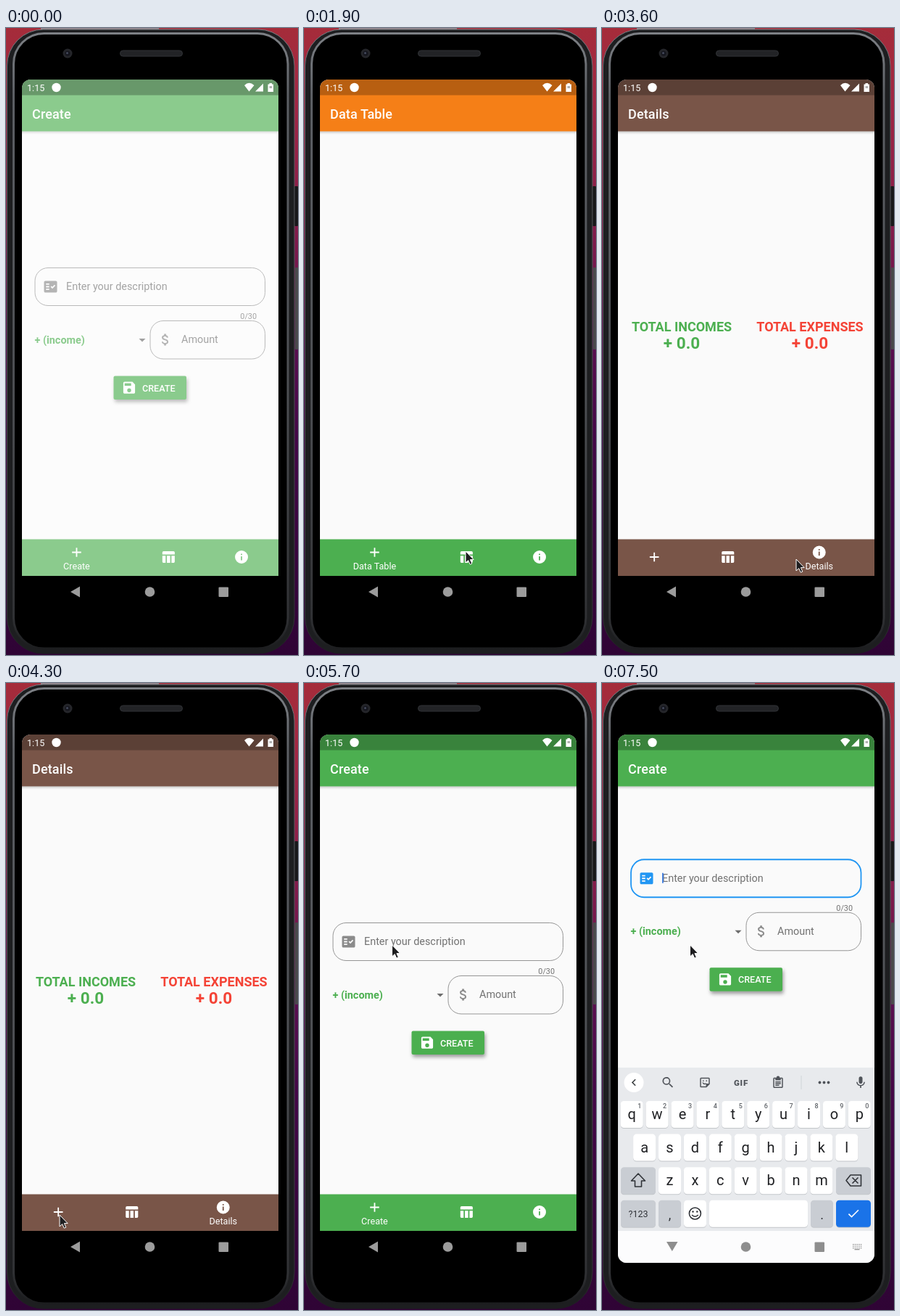
An HTML page that plays this animation: 403 px wide and 864 px high, repeating every 8 s.

```html
<!DOCTYPE html>
<html lang="en">
<head>
<meta charset="utf-8">
<title>Budget app demo</title>
<style>
html, body { margin: 0; width: 100%; height: 100%; overflow: hidden; background: #000; }
svg { display: block; width: 403px; height: 864px; font-family: Roboto, sans-serif; }
.mid { text-anchor: middle; }
.med { font-weight: 500; }
.bold { font-weight: 700; }
</style>
</head>
<body>
<svg id="stage" viewBox="0 0 403 864" xmlns="http://www.w3.org/2000/svg"></svg>
<script>
const LOOP = 8000, STEP = 100;
const GREEN = '#4caf50', GREY = '#8b8b8b', INK = '#50545a';
const PAGES = [
  { title: 'Create', color: GREEN },
  { title: 'Data Table', color: '#f57f17' },
  { title: 'Details', color: '#795548' }
];

const P = {
  add: 'M19 13h-6v6h-2v-6H5v-2h6V5h2v6h6z',
  table: 'M10 10h5v11h-5zM17 21h3c1.1 0 2-.9 2-2v-9h-5zM20 3H5c-1.1 0-2 .9-2 2v3h19V5c0-1.1-.9-2-2-2zM3 19c0 1.1.9 2 2 2h3V10H3z',
  info: 'M12 2a10 10 0 1 0 0 20a10 10 0 1 0 0-20zm1 15h-2v-6h2zm0-8h-2V7h2z',
  save: 'M17 3H5c-1.1 0-2 .9-2 2v14c0 1.1.9 2 2 2h14c1.1 0 2-.9 2-2V7zM12 19a3 3 0 1 1 0-6a3 3 0 1 1 0 6zM15 9H5V5h10z',
  list: 'M20 3H4c-1.1 0-2 .9-2 2v14c0 1.1.9 2 2 2h16c1.1 0 2-.9 2-2V5c0-1.1-.9-2-2-2zM10 17H5v-2h5zM10 13H5v-2h5zM10 9H5V7h5zM14.8 15L12 12.2l1.4-1.4 1.4 1.4L18 9l1.4 1.4z',
  money: 'M11.8 10.9c-2.27-.59-3-1.2-3-2.15 0-1.09 1.01-1.85 2.7-1.85 1.78 0 2.44.85 2.5 2.1h2.21c-.07-1.72-1.12-3.3-3.21-3.81V3h-3v2.16c-1.94.42-3.5 1.68-3.5 3.61 0 2.31 1.91 3.46 4.7 4.13 2.5.6 3 1.48 3 2.41 0 .69-.49 1.79-2.7 1.79-2.06 0-2.87-.92-2.98-2.1h-2.2c.12 2.19 1.76 3.42 3.68 3.83V21h3v-2.15c1.95-.37 3.5-1.5 3.5-3.55 0-2.84-2.43-3.81-4.7-4.4z',
  search: 'M15.5 14h-.8l-.3-.3A6.5 6.5 0 1 0 13.7 14.4l.3.3v.8l5 5 1.5-1.5zM9.5 14a4.5 4.5 0 1 1 0-9a4.5 4.5 0 1 1 0 9z',
  mic: 'M12 14c1.7 0 3-1.3 3-3V5a3 3 0 0 0-6 0v6c0 1.7 1.3 3 3 3zm5.3-3c0 3-2.5 5.1-5.3 5.1S6.7 14 6.7 11H5c0 3.4 2.7 6.2 6 6.7V21h2v-3.3c3.3-.5 6-3.3 6-6.7z',
  palette: 'M12 3a9 9 0 0 0 0 18c.8 0 1.5-.7 1.5-1.5 0-.4-.2-.7-.4-1-.2-.3-.4-.6-.4-1 0-.8.7-1.5 1.5-1.5H16c2.8 0 5-2.2 5-5 0-4.4-4-8-9-8zM5 10.5h3v2h-3zM8 6.5h3v2h-3zM13 6.5h3v2h-3zM16 10.5h3v2h-3z',
  chevron: 'M15.4 7.4L14 6l-6 6 6 6 1.4-1.4L10.8 12z',
  check: 'M9 16.2L4.8 12l-1.4 1.4L9 19 21 7l-1.4-1.4z',
  clip: 'M19 3h-4a3 3 0 0 0-6 0H5c-1.1 0-2 .9-2 2v15c0 1.1.9 2 2 2h14c1.1 0 2-.9 2-2V5c0-1.1-.9-2-2-2zM5 5h2v3h10V5h2v15H5zM7 10h10v2H7zM7 13h10v2H7zM7 16h7v2H7z',
  note: 'M3 3h18v9h-2V5H5v14h6v2H3zM10 9l9 5-3 1 4 4-2 2-4-4-1 3z',
  sticker: 'M3 5q0-2 2-2h14q2 0 2 2v10l-6 6H5q-2 0-2-2zM5 5v14h9v-5h5V5zM8 8h2v2H8zM14 8h2v2h-2zM7 12h2q2 3 5 1l1 1q-5 4-8-2z'
};

const icon = (name, cx, cy, fill, size = 21.6, id = '') =>
  `<path ${id && `id="${id}"`} d="${P[name]}" fill="${fill}" fill-rule="evenodd" transform="translate(${cx - size / 2} ${cy - size / 2}) scale(${size / 24})"/>`;
const rect = (x, y, w, h, fill, r = 0, more = '') =>
  `<rect x="${x}" y="${y}" width="${w}" height="${h}" rx="${r}" fill="${fill}" ${more}/>`;
const text = (s, x, y, size, fill, more = '') =>
  `<text x="${x}" y="${y}" font-size="${size}" fill="${fill}" ${more}>${s}</text>`;
const circle = (x, y, r, fill, more = '') =>
  `<circle cx="${x}" cy="${y}" r="${r}" fill="${fill}" ${more}/>`;
const line = (d, color, w = 1.6) =>
  `<path d="${d}" fill="none" stroke="${color}" stroke-width="${w}" stroke-linejoin="round"/>`;
const gradient = (id, stops) =>
  `<linearGradient id="${id}" x2="0" y2="1">${stops.map(([o, c, a = 1]) =>
    `<stop offset="${o}" stop-color="${c}" stop-opacity="${a}"/>`).join('')}</linearGradient>`;

function phone() {
  return rect(0, 0, 403, 864, 'url(#wall)') +
    rect(48, 0, 163, 2, '#94868d') +
    rect(398, 218, 5, 55, '#18181a', 1) + rect(399, 330, 4, 113, '#4a494c', 1) +
    rect(1.5, 2, 396.5, 860, '#1d1e20', 50, 'stroke="url(#rim)"') +
    rect(10.5, 7.5, 378.5, 847.5, '#000', 42, 'stroke="url(#rim)" stroke-width="3"') +
    circle(85, 35, 6.5, '#25262a') + circle(85, 35, 3.5, '#15161e') + circle(84.5, 34.5, 1.5, '#454a5c') +
    rect(157.5, 31, 86, 8, '#222326', 4, 'stroke="#303236"');
}

function statusBar() {
  return rect(22, 71, 354, 21.6, '#000', 0, 'opacity=".25"') +
    text('1:15', 29, 86.5, 12.6, '#fff') + circle(69.5, 82, 6.2, '#fff') +
    '<path d="M335.5 87.5L329 79Q335.5 72.5 342.5 79ZM344 87.500H355V76.500Z" fill="#fff"/>' +
    '<path d="M361.5 77.5h2v-1.5h3.5v1.5h2V88h-7.5Z" fill="#fff"/>' +
    rect(363.5, 80, 3.5, 3, '#000', 0, 'opacity=".3"');
}

function form() {
  const hint = '#727272';
  return `<g id="form">
    ${rect(40, 330.5, 317.5, 52, 'none', 18, 'id="field"')}
    ${icon('list', 61.5, 356.5, GREY, 21.6, 'fieldIcon')}
    ${text('Enter your description', 83, 361, 14.4, hint)}
    ${rect(83, 349, 1.8, 14, '#3f7de0', 0, 'id="caret"')}
    ${text('0/30', 346, 401, 10.8, hint, 'text-anchor="end"')}
    ${text('+ (income)', 39.5, 434.7, 14.4, GREEN, 'class="bold"')}
    <path d="M183.5 428h9l-4.5 4.5Z" fill="#6d6d6d"/>
    ${rect(199, 403.5, 158.5, 52.5, 'none', 18, `stroke="${GREY}" stroke-width=".9"`)}
    ${icon('money', 220, 429.5, GREY)}
    ${text('Amount', 242, 434, 14.4, hint)}
    ${rect(148.5, 479.5, 100.5, 32.5, GREEN, 2, 'filter="url(#lift)"')}
    ${icon('save', 170, 495.7, '#fff')}
    ${text('CREATE', 188, 500.5, 12.6, '#fff', 'class="med"')}
  </g>`;
}

function details() {
  const total = (label, x, color) =>
    text(label, x, 417.5, 18, color, 'class="mid bold"') +
    text('+ 0.0', x, 442, 22.5, color, 'class="mid bold"');
  return `<g id="details">${total('TOTAL INCOMES', 110, GREEN)}${total('TOTAL EXPENSES', 287, '#f44336')}</g>`;
}

// Drawn with its top at y = 0.
function keyboard() {
  const pitch = 34.9, keyH = 37, rows = ['qwertyuiop', 'asdfghjkl', 'zxcvbnm'];
  const starts = [41.2, 58.6, 93.5], dark = '#c9cdd3';
  const key = (x, y, w, fill) => rect(x, y + 1, w, keyH, '#c3c6ca', 4.5) + rect(x, y, w, keyH, fill, 4.5);
  let out = rect(22, 0, 354, 270, '#e8eaed') + rect(22, 225, 354, 60, '#fcfcfd') +
    circle(44, 20.5, 13.5, '#fff') + icon('chevron', 44, 20.5, '#3c4043', 19);

  const early = icon('clip', 91, 20.5, INK, 18) +
    circle(142, 20.5, 4.5, 'none', `stroke="${INK}" stroke-width="3.6"`) +
    circle(142, 20.5, 7, 'none', `stroke="${INK}" stroke-width="2.4" stroke-dasharray="3.665"`) +
    icon('palette', 193, 20.5, INK, 20) + icon('note', 243, 20.5, INK, 18);
  const late = icon('search', 91, 20.5, INK, 20) + icon('sticker', 142, 20.5, INK, 18) +
    text('GIF', 192, 24.5, 11.5, INK, 'class="mid" font-weight="900" letter-spacing=".8"') +
    icon('clip', 243, 20.5, INK, 18);
  out += `<g id="early">${early}</g><g id="late">${late}</g>` + rect(274.5, 11, 1, 19, '#d0d3d7');
  for (const dx of [-6, 0, 6]) out += circle(306.5 + dx, 20.5, 1.9, INK);
  out += icon('mic', 357, 20.5, INK, 20);

  rows.forEach((row, r) => [...row].forEach((ch, i) => {
    const x = starts[r] + i * pitch, y = 46 + r * 45.6;
    out += key(x - 15.5, y, 31, '#fff') + text(ch, x, y + 25, 20, '#202124', 'class="mid"');
    if (!r) out += text((i + 1) % 10, x + 10.5, y + 9.5, 9, '#5f6368', 'class="mid med"');
  }));

  out += key(26, 137.2, 48, dark) + key(323, 137.2, 48, dark) +
    line('M50 146l-9.5 10h5v8h9v-8h5Z', '#303338') +
    line('M337 155.5l6-7.5h14.5v15h-14.5ZM345.5 151.5l8 8m0-8l-8 8', '#303338');
  const y = 182.7;
  out += key(26, y, 48, dark) + text('?123', 50, y + 23, 12.5, '#303338', 'class="mid"') +
    key(78, y, 31, dark) + text(',', 93.5, y + 26, 18, '#303338', 'class="mid"') +
    key(113, y, 31, '#fff') + circle(128.4, 201, 8, 'none', 'stroke="#303338" stroke-width="1.6"') +
    circle(125.5, 198.5, 1.2, '#303338') + circle(131.3, 198.5, 1.2, '#303338') +
    line('M124 203q4.4 4.5 8.8 0', '#303338') +
    key(148, y, 136, '#fff') + key(288, y, 31, dark) + text('.', 303.5, y + 26, 18, '#303338', 'class="mid"') +
    key(323, y, 48, '#1a73e8') + icon('check', 347, 201, '#fff', 20);
  return `<g id="keys">${out}</g>`;
}

function systemNav() {
  let board = 'M348.5 780h7v1.3h-7z';
  for (let i = 0; i < 15; i++) board += `M${346 + (i % 5) * 2.7} ${773 + Math.floor(i / 5) * 2.5}h1.5v1.3h-1.5z`;
  return `<g id="sysNav"><path id="back"/><circle cx="198.5" cy="777" r="6.8"/>
    <rect x="293.5" y="770.5" width="13.5" height="13.5" rx="1"/><path id="boardIcon" d="${board}"/></g>`;
}

const stage = document.getElementById('stage');
stage.innerHTML = `<defs>
  ${gradient('wall', [[0, '#a52c3a'], [.12, '#a02644'], [.32, '#821c4b'], [.5, '#5a0f50'], [.65, '#430747'], [1, '#2f0435']])}
  ${gradient('rim', [[0, '#7d8085'], [.1, '#5c5f64'], [.6, '#4b4d51'], [.95, '#303134'], [1, '#1c1d1f']])}
  ${gradient('drop', [[0, '#000', .24], [.4, '#000', .09], [1, '#000', 0]])}
  <filter id="lift" x="-20%" y="-30%" width="140%" height="190%">
    <feDropShadow dx="1.5" dy="3.5" stdDeviation="2.6" flood-color="#000" flood-opacity=".38"/></filter>
  <clipPath id="screen">${rect(22, 71, 354, 728, '#000', 12)}</clipPath>
</defs>
${phone()}
<g clip-path="url(#screen)">
  ${rect(22, 71, 354, 684, '#fafafa')}
  ${form()}${details()}
  ${rect(22, 142.4, 354, 4.5, 'url(#drop)')}
  ${rect(22, 71, 354, 71.4, GREEN, 0, 'id="bar"')}
  ${rect(22, 704.5, 354, 50.5, GREEN, 0, 'id="nav"')}
  ${rect(22, 71, 354, 684, '#fff', 0, 'id="veil"')}
  ${text('', 36, 124.5, 18, '#fff', 'id="title" class="med" letter-spacing=".135"')}
  ${statusBar()}
  ${['add', 'table', 'info'].map((n, i) => `<g id="tab${i}">${icon(n, 0, 0, '#fff')}</g>`).join('')}
  ${text('', 0, 745.5, 12.6, '#fff', 'id="label" class="mid"')}
  ${rect(22, 755, 354, 44, '#000')}
  ${keyboard()}${systemNav()}
</g>
<path id="cursor" d="M0 0V16L3.7 12.6 6.2 18.2 8.8 17.1 6.4 11.6H11.2Z" fill="#1d1d1f" stroke="#fff" stroke-width="1" stroke-linejoin="round"/>`;

const el = {};
stage.querySelectorAll('[id]').forEach(e => el[e.id] = e);
const set = (name, attrs) => { for (const k in attrs) el[name].setAttribute(k, attrs[k]); };
const show = (name, on) => set(name, { visibility: on ? 'visible' : 'hidden' });

// Linear track through [time, ...values].
function track(keys, t) {
  if (t <= keys[0][0]) return keys[0].slice(1);
  for (let i = 1; i < keys.length; i++) {
    const a = keys[i - 1], b = keys[i];
    if (t <= b[0]) return a.slice(1).map((v, j) => v + (b[j + 1] - v) * (t - a[0]) / (b[0] - a[0]));
  }
  return keys[keys.length - 1].slice(1);
}

const pointer = [
  [1000, 368, 618], [1200, 276, 684], [1400, 223, 721], [2400, 223, 721], [2800, 328, 722],
  [3200, 328, 722], [3600, 268, 732], [3900, 149, 743], [4300, 74, 733], [4600, 74, 733],
  [4800, 90.5, 626], [5300, 141, 390], [5700, 121.5, 361]
];
const keyTop = [[6700, 799], [6800, 740], [6900, 595], [7000, 543], [7100, 530]];
const pageAt = t => t < 1900 ? 0 : t < 3100 ? 1 : t < 4500 ? 2 : 0;

function draw(time) {
  const t = Math.floor(time / STEP) * STEP;
  const page = pageAt(t), tab = pageAt(t - STEP);
  set('bar', { fill: PAGES[page].color });
  set('nav', { fill: PAGES[tab].color });
  el.title.textContent = el.label.textContent = PAGES[page].title;
  set('veil', { opacity: Math.max(0, .35 - t * .0025) });
  show('form', page === 0);
  show('details', page === 2);

  // The chosen tab is half again as wide as the others.
  const unit = 354 / 3.5;
  let left = 22;
  for (let i = 0; i < 3; i++) {
    const w = unit * (i === tab ? 1.5 : 1), x = left + w / 2 - .4;
    set('tab' + i, { transform: `translate(${x} ${i === tab ? 722.5 : 729})` });
    if (i === tab) set('label', { x });
    left += w;
  }

  const focus = t >= 6500, [top] = track(keyTop, t);
  const open = top < 799, up = top < 600;
  set('field', { stroke: focus ? '#2196f3' : GREY, 'stroke-width': focus ? 1.8 : .9 });
  set('fieldIcon', { fill: focus ? '#2196f3' : GREY });
  set('caret', { opacity: focus && Math.floor((t - 6500) / 500) % 2 === 0 ? 1 : 0 });
  set('form', { transform: `translate(0 ${-Math.max(0, (704.5 - top) / 2)})` });
  set('keys', { transform: `translate(0 ${top})` });
  show('keys', open);
  set('early', { opacity: t < 7000 ? 1 : 0 });
  set('late', { opacity: t < 7000 ? 0 : 1 });
  set('sysNav', { fill: !open ? '#9c9c9c' : up ? '#8e8e8e' : '#c0c1c3' });
  set('back', { d: up ? 'M89 770h15.5l-7.7 13Z' : 'M102 769.5v15L89 777Z' });
  show('boardIcon', open);

  const [x, y] = track(pointer, t);
  set('cursor', { transform: `translate(${x} ${y})` });
  show('cursor', t >= 1000);
}

const start = performance.now();
function tick() {
  draw((performance.now() - start) % LOOP);
  requestAnimationFrame(tick);
}
tick();
</script>
</body>
</html>
```
